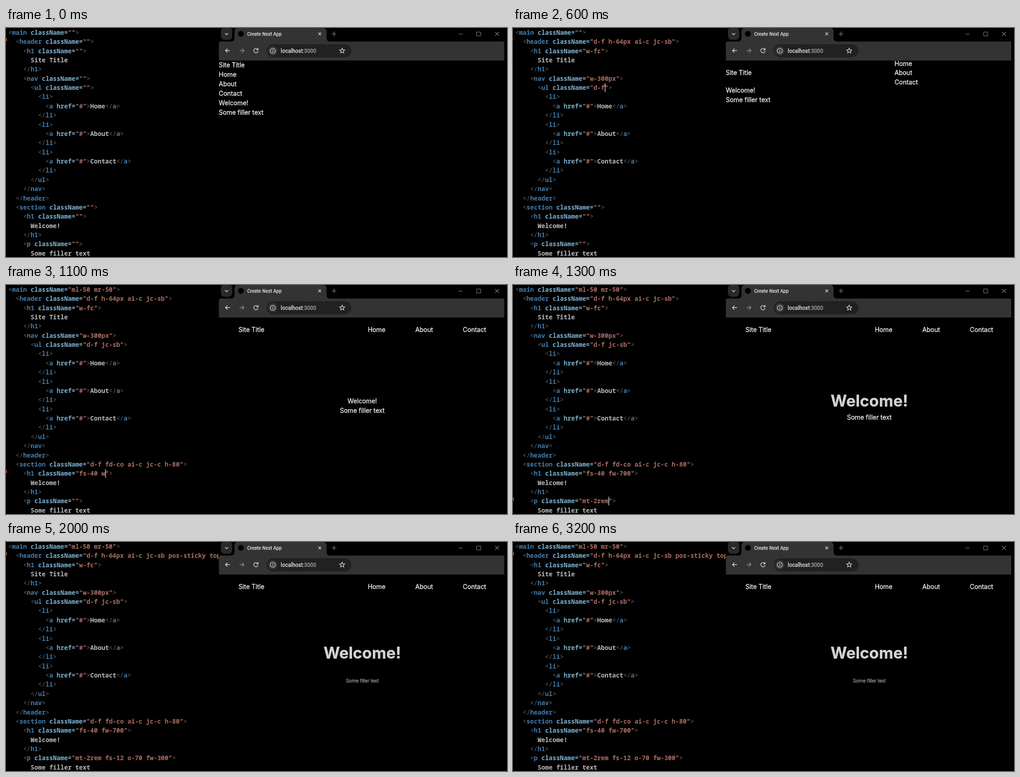
Animation of 1105 by 507 pixels, one loop 3.7 s. Source, as an HTML page with a canvas:

```html
<!DOCTYPE html>
<html lang="en">
<head>
<meta charset="utf-8">
<title>Utility classes</title>
<style>
html, body { margin: 0; width: 100%; height: 100%; overflow: hidden; background: #000; }
canvas { display: block; }
</style>
</head>
<body>
<canvas id="stage" width="1105" height="507"></canvas>
<script>
const ctx = document.getElementById("stage").getContext("2d");
const LOOP = 3700, STEP = 100;

// ---------- code editor ----------
const CHAR = 8.22, ROW = 20.37;
const lines = `<main className="">
  <header className="">
    <h1 className="">
      Site Title
    </h1>
    <nav className="">
      <ul className="">
        <li>
          <a href="#">Home</a>
        </li>
        <li>
          <a href="#">About</a>
        </li>
        <li>
          <a href="#">Contact</a>
        </li>
      </ul>
    </nav>
  </header>
  <section className="">
    <h1 className="">
      Welcome!
    </h1>
    <p className="">
      Some filler text`.split("\n");

const [MAIN, HEADER, TITLE, NAV, LIST, SECTION, HEADING, PARA] = [0, 1, 2, 5, 6, 19, 20, 23];
const bar = "d-f h-64px ai-c jc-sb";
// Each step sets the class text of one or two lines; the caret follows the last.
const edits = [
  [[HEADER, ""]],
  [[HEADER, "d-f"]],
  [[HEADER, "d-f h-64px"]],
  [[HEADER, "d-f h-64px ai-c"]],
  [[HEADER, bar]],
  [[TITLE, "w-fc"], [NAV, "w-3"]],
  [[NAV, "w-300px"], [LIST, "d-f"]],
  [[LIST, "d-f jc-sb"], [MAIN, "ml-50 mr-50"]],
  [[SECTION, "d-f"]],
  [[SECTION, "d-f fd-co ai-c"]],
  [[SECTION, "d-f fd-co ai-c jc-c h-80"]],
  [[HEADING, "fs-40 w"]],
  [[HEADING, "fs-40 fw-700"]],
  [[PARA, "mt-2rem"]],
  [[PARA, "mt-2rem fs-12"]],
  [[PARA, "mt-2rem fs-12 "]],
  [[PARA, "mt-2rem fs-12 o-70"]],
  [[PARA, "mt-2rem fs-12 o-70 fw-300"]],
  [[HEADER, bar + " pos-"]],
  [[HEADER, bar + " pos-sticky"]],
  [[HEADER, bar + " pos-sticky top-0"]]
];

const styles = {
  mark: ["#686868", 500],
  tag: ["#437cab", 600],
  attr: ["#7bb0cf", 600],
  string: ["#ab6e60", 600],
  text: ["#b9b9b9", 600]
};
const tokens = /(?<string>"[^"]*")|(?<attr>(className|href)=)|(?<mark><\/?|>)|(?<tag>(?<=<\/?)\w+)|(?<text>[^<>\s][^<>]*)/g;

function drawCode(step) {
  const classes = {};
  for (const edit of edits.slice(0, step + 1))
    for (const [row, value] of edit) classes[row] = value;

  lines.forEach((line, row) => {
    const source = row in classes ? line.replace('""', `"${classes[row]}"`) : line;
    for (const match of source.matchAll(tokens)) {
      const kind = Object.keys(styles).find(name => match.groups[name] !== undefined);
      const [color, weight] = styles[kind];
      ctx.font = `${weight} 13.7px "Noto Sans Mono", monospace`;
      ctx.fillStyle = color;
      ctx.fillText(match[0], 5 + match.index * CHAR, 14.9 + row * ROW);
    }
  });

  const [row, value] = edits[step].at(-1);
  if (step && step !== 15) {
    const column = lines[row].indexOf('""') + 1 + value.length;
    rect(5 + column * CHAR, row * ROW, 1.7, 19.5, "#b5b5b5");
  }
  if ([HEADER, HEADING, PARA].includes(row)) rect(0, 2 + row * ROW, 2, 7, "#a04436");
}

// ---------- drawing helpers ----------
function rect(x, y, w, h, color, radius = 0) {
  ctx.fillStyle = color;
  ctx.beginPath();
  ctx.roundRect(x, y, w, h, radius);
  ctx.fill();
}

function disc(x, y, r, color) {
  rect(x - r, y - r, 2 * r, 2 * r, color, r);
}

function stroke(path, color, width = 1.4) {
  ctx.strokeStyle = color;
  ctx.lineWidth = width;
  ctx.stroke(new Path2D(path));
}

// A hairline outline thickens the glyphs without changing their advance.
function write(text, x, y, font, color, align = "left") {
  ctx.font = font;
  ctx.textAlign = align;
  ctx.fillStyle = ctx.strokeStyle = color;
  ctx.lineWidth = 0.35;
  ctx.fillText(text, x, y);
  ctx.strokeText(text, x, y);
  ctx.textAlign = "left";
}

function cross(x, y, r, color) {
  stroke(`M${x - r} ${y - r}l${2 * r} ${2 * r}m0 ${-2 * r}l${-2 * r} ${2 * r}`, color, 1.2);
}

function starPath(x, y, r) {
  const points = Array.from({ length: 10 }, (_, i) => {
    const angle = i * Math.PI / 5, reach = i % 2 ? r * 0.45 : r;
    return `${x + reach * Math.sin(angle)} ${y - reach * Math.cos(angle)}`;
  });
  return `M${points.join("L")}Z`;
}

// ---------- browser ----------
function drawBrowser() {
  const light = "#dedede", dim = "#8c8c8c", panel = "#333";
  rect(469, 0, 636, 507, "#000");

  rect(474, 0, 25, 26, "#2a2a2a", [6, 6, 8, 8]);
  stroke("M483 11.5l3.5 3.5 3.5-3.5", light);
  ctx.fillStyle = panel;
  ctx.fill(new Path2D("M496 30q8 0 8-8V8q0-8 8-8h187q8 0 8 8v14q0 8 8 8z"));
  disc(518, 13, 6.5, "#000");
  write("Create Next App", 532, 17, "10.5px Roboto, sans-serif", light);
  cross(692, 13, 3, light);
  stroke("M718.5 13h10m-5-5v10", dim, 1.2);
  stroke("M998 13.5h9M1038 9h9v8.5h-9z", dim, 1);
  cross(1083, 13, 4.2, dim);

  rect(469.5, 30, 629.5, 42, panel, [4, 0, 0, 0]);
  stroke("M494 50h-10m4.5-4.5l-4.5 4.5 4.5 4.5", light);
  stroke("M515 50h10m-4.5-4.5l4.5 4.5-4.5 4.5", dim);
  stroke("M555 47a4.8 4.8 0 1 0 1 4.5M556 44.5v4h-4", light);
  rect(575, 36, 187, 29, "#212121", 14.5);
  disc(588.5, 50.5, 10, "#3a3a3a");
  stroke("M583 50.5a5.5 5.5 0 1 1 11 0a5.5 5.5 0 1 1-11 0M588.5 49.5v4m0-6.8v1.5", light, 1.2);
  const address = "11.9px Roboto, sans-serif";
  write("localhost", 606, 54.5, address, light);
  write(":3000", 606 + ctx.measureText("localhost").width, 54.5, address, "#a0a0a0");
  stroke(starPath(741.5, 50.5, 6), light, 1.2);
}

// ---------- rendered page, one step behind the editor ----------
const LINE = 20.9, TOP = 82, SIZE = 13.92;

function label(text, x, y, { size = SIZE, weight = 400, align = "left", color = "#ececec" } = {}) {
  write(text, x, y + size * 0.3635, `${weight} ${size}px Inter, sans-serif`, color, align);
}

function drawHeader(step, left, right) {
  const centered = step >= 4, inRow = step >= 7;
  const mid = centered ? 99.4 : TOP;
  label("Site Title", left, mid);

  let x = left, y = mid;
  if (step < 2) y += LINE;
  else if (step < 5) x += 57.5;
  else x = right - (step < 6 ? 52 : 261);
  if (centered && !inRow) y -= LINE;
  ["Home", "About", "Contact"].forEach((name, i) =>
    label(name, x + (inRow ? i * 104.8 : 0), y + (inRow ? 0 : i * LINE)));
}

function drawSection(step, left, right) {
  const heading = "Welcome!", filler = "Some filler text";
  if (step < 10) {
    const y = step < 2 ? TOP + 4 * LINE : step < 3 ? TOP + 3 * LINE : 137.8;
    const beside = step === 9;
    label(heading, left, y);
    label(filler, left + (beside ? 66 : 0), y + (beside ? 0 : LINE));
    return;
  }
  const big = step >= 12, small = step >= 15;
  const first = big ? 52.2 : LINE, second = small ? 15.7 : LINE;
  const gap = step >= 14 ? 27.8 : 0;
  const top = step < 11 ? 127.3 : 267.2 - (first + gap + second) / 2;
  const mid = (left + right) / 2;
  label(heading, mid, top + first / 2, {
    size: big ? 34.8 : SIZE,
    weight: step >= 13 ? 700 : 400,
    align: "center",
    color: big ? "#d3d3d3" : "#ececec"
  });
  label(filler, mid, top + first + gap + second / 2, {
    size: small ? 10.44 : SIZE,
    weight: step >= 18 ? 300 : 400,
    align: "center",
    color: step >= 17 ? "#acacac" : "#ececec"
  });
}

function drawPage(step) {
  const left = step < 8 ? 469.3 : 512.8;
  const right = step < 9 ? 1102.4 : 1058.9;
  ctx.save();
  ctx.beginPath();
  ctx.rect(469, 72, 629.5, 435);
  ctx.clip();
  drawHeader(step, left, right);
  drawSection(step, left, right);
  ctx.restore();
}

function frame(now) {
  const step = Math.min(edits.length - 1, Math.floor(now % LOOP / STEP));
  rect(0, 0, 1105, 507, "#000");
  drawCode(step);
  drawBrowser();
  drawPage(step);
  requestAnimationFrame(frame);
}
requestAnimationFrame(frame);
</script>
</body>
</html>
```
